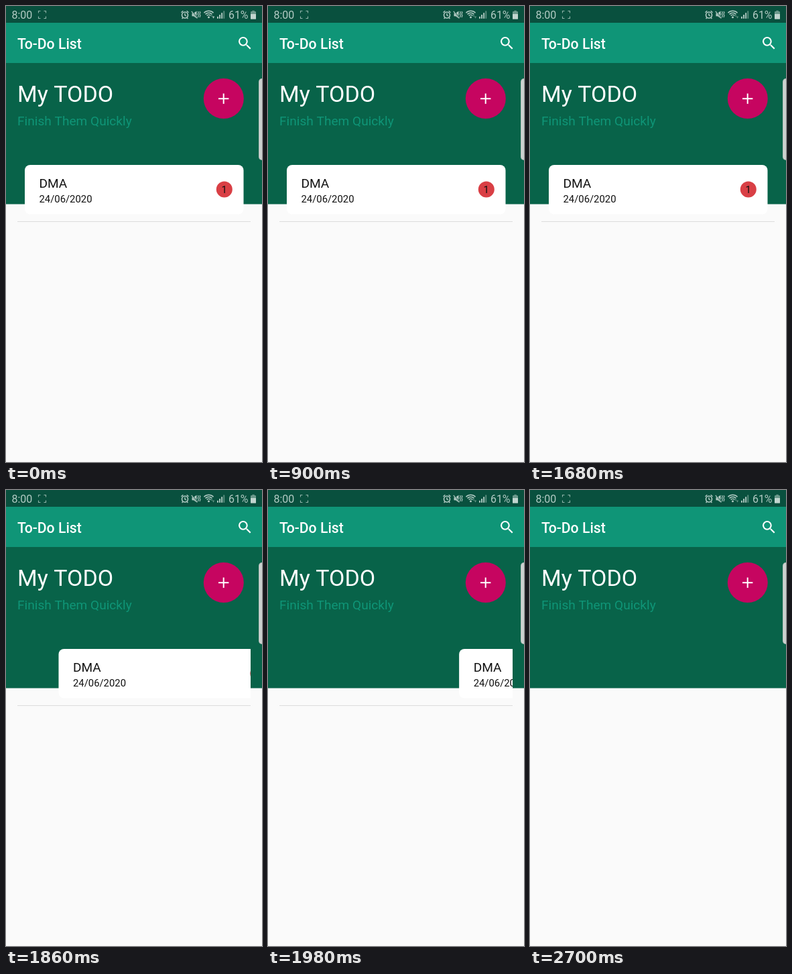
Animation of 382x680 px, one loop 3180 ms. Source, as an HTML page with a canvas:

```html
<!DOCTYPE html>
<html lang="en">
<head>
<meta charset="utf-8">
<title>To-Do List</title>
<style>
  html, body { margin: 0; width: 100%; height: 100%; overflow: hidden; background: #fafafa; }
  canvas { display: block; width: 382px; height: 680px; }
</style>
</head>
<body>
<canvas id="stage" width="382" height="680"></canvas>
<script>
const ctx = document.getElementById('stage').getContext('2d');
const LOOP = 3180, TICK = 60;
const STATUS_INK = '#b3cbc4';
const searchIcon = new Path2D('M15.5 14h-.79l-.28-.27A6.47 6.47 0 0 0 16 9.5 6.5 6.5 0 1 0 9.5 16c1.61 0 3.09-.59 4.23-1.57l.27.28v.79l5 4.99L20.49 19l-4.99-5zm-6 0a4.5 4.5 0 1 1 0-9 4.5 4.5 0 0 1 0 9z');

function rect(x, y, w, h, color) {
  ctx.fillStyle = color;
  ctx.fillRect(x, y, w, h);
}

function roundRect(x, y, w, h, r, color) {
  ctx.beginPath();
  ctx.roundRect(x, y, w, h, r);
  ctx.fillStyle = color;
  ctx.fill();
}

function disc(x, y, r, color) {
  ctx.beginPath();
  ctx.arc(x, y, r, 0, Math.PI * 2);
  ctx.fillStyle = color;
  ctx.fill();
}

function text(str, x, y, size, color, weight = 400, align = 'left') {
  ctx.font = `${weight} ${size}px Roboto, sans-serif`;
  ctx.textAlign = align;
  ctx.fillStyle = color;
  ctx.fillText(str, x, y);
}

function stroke(path, color, width) {
  ctx.strokeStyle = color;
  ctx.lineWidth = width;
  ctx.stroke(new Path2D(path));
}

function fill(path, color) {
  ctx.fillStyle = color;
  ctx.fill(new Path2D(path));
}

function recorder(on) {
  stroke('M48.5 10.5V7.5H51.5M56.5 7.5H59.5V10.5M59.5 15.5V18.5H56.5M51.5 18.5H48.5V15.5', '#8fb2a8', 1.1);
  if (!on) return;
  stroke('M51.2 10.8H55.8V15.2H51.2Z', STATUS_INK, 1);
  fill('M56 13L58.8 10.8V15.2Z', STATUS_INK);
}

function statusIcons(brightWifi) {
  // alarm clock
  ctx.beginPath();
  ctx.arc(267, 13.5, 4.5, 0, Math.PI * 2);
  ctx.strokeStyle = STATUS_INK;
  ctx.lineWidth = 1.6;
  ctx.stroke();
  stroke('M267 10.8V13.8L269 15M261.5 9.8L264.3 7.3M272.5 9.8L269.7 7.3M264 17.2L262.6 19M270 17.2L271.4 19', STATUS_INK, 1.4);

  // muted speaker with vibration
  fill('M277.5 10.8H280L284.5 7.5V18.5L280 15.2H277.5Z', STATUS_INK);
  stroke('M277 7.5L286 18.5', '#09503e', 2);
  stroke('M276.8 7.8L285.5 18.4', STATUS_INK, 1.2);
  stroke('M286.4 8L287.4 10L286.2 12L287.4 14L286.4 17M289 8L290 10L288.8 12L290 14L289 17', STATUS_INK, 1.1);

  // wifi
  ctx.lineWidth = 1.5;
  for (const r of [4, 7, 10]) {
    ctx.beginPath();
    ctx.arc(302.5, 17.3, r, -Math.PI * 0.75, -Math.PI * 0.25);
    ctx.stroke();
  }
  disc(302.5, 16.8, 1.5, STATUS_INK);
  fill('M305.5 15.5L307 13L308.5 15.5Z', '#5d8f80');
  fill('M307.8 15.5H311.2L309.5 18.7Z', brightWifi ? STATUS_INK : '#5d8f80');

  // signal
  for (let i = 0; i < 4; i++) {
    const h = 3 + i * 2.8;
    rect(315 + i * 3.1, 18.8 - h, 1.9, h, i < 3 ? STATUS_INK : '#5d8f80');
  }

  // battery
  rect(367.3, 6.8, 3.5, 1.5, '#6b988b');
  roundRect(365, 8, 8, 11.5, 1, '#6b988b');
  rect(365, 12, 8, 7.5, '#c1d5cf');
}

function card(dx) {
  ctx.save();
  ctx.beginPath();
  ctx.rect(17, 230, 348, 92);
  ctx.clip();
  ctx.translate(dx, 0);
  roundRect(28, 237, 326.5, 73.5, 8, '#fff');
  text('DMA', 49.5, 271, 19.1, '#111');
  text('24/06/2020', 49.5, 292.5, 14.85, '#111');
  disc(325.8, 273.6, 12, '#d93f45');
  text('1', 325.6, 279.2, 14.85, '#111', 400, 'center');
  ctx.restore();
}

function draw(t) {
  rect(0, 0, 382, 680, '#fafafa');
  rect(0, 85, 382, 210.5, '#086349');
  rect(0, 25, 382, 60, '#0f9577');
  rect(0, 0, 382, 25, '#09503e');

  text('8:00', 8.5, 19, 16, STATUS_INK);
  const recording = (t >= 360 && t < 900) || (t >= 1380 && t < 1680) || (t >= 2220 && t < 2700);
  recorder(recording);
  statusIcons(t < 900);
  text('61%', 332, 19, 15.9, STATUS_INK);

  text('To-Do List', 17, 63.5, 21.2, '#fff', 500);
  ctx.save();
  ctx.translate(343.8, 42.8);
  ctx.scale(1.06, 1.06);
  ctx.fillStyle = '#fff';
  ctx.fill(searchIcon, 'evenodd');
  ctx.restore();

  text('My TODO', 17, 142.8, 34, '#fff');
  text('Finish Them Quickly', 17, 177.5, 19.1, '#0f9577');

  disc(324.8, 138, 30, '#c60560');
  rect(317, 137.2, 15.4, 2, '#fff');
  rect(323.7, 130.5, 2, 15.4, '#fff');
  roundRect(377, 108, 10, 122, 5, '#b5bfbb');
  roundRect(378, 109, 10, 120, 4, '#cdd2d0');

  if (t < 2160) rect(17, 321, 348, 1, '#dcdcdc');
  const swipe = t < 1860 ? 0 : 50.5 + (t - 1860) * 1.722;
  if (swipe < 338) card(swipe);
}

function frame() {
  const t = performance.now() % LOOP;
  draw(Math.floor(t / TICK) * TICK);
  requestAnimationFrame(frame);
}
frame();
</script>
</body>
</html>
```
